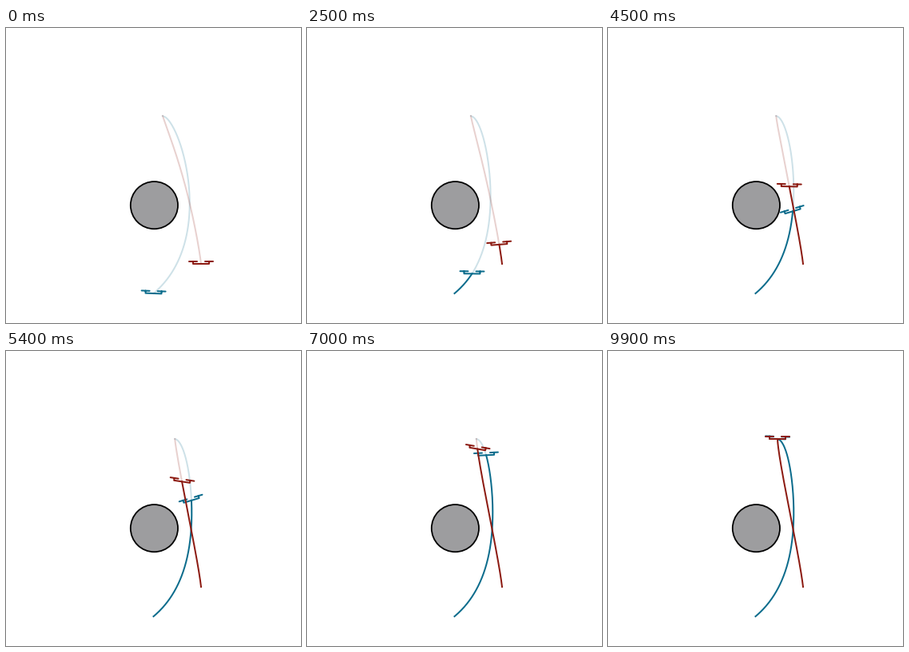
Recreate the animation shown at these times as a matplotlib script. Size 369x369 px, loop 10 s.

```python
import numpy as np
import matplotlib.pyplot as plt
from matplotlib.animation import FuncAnimation
from matplotlib.patches import Circle

SIZE = 369
FRAMES, STEP = 100, 100
LOOP = FRAMES * STEP / 1000
BLUE, RED = "#0b6c8c", "#8c1a11"
GRAVITY = 26  # pixels per second squared


def bezier(p0, p1, p2, p3):
    t = np.linspace(0, 1, 500)[:, None]
    p0, p1, p2, p3 = map(np.array, (p0, p1, p2, p3))
    return ((1 - t) ** 3 * p0 + 3 * t * (1 - t) ** 2 * p1
            + 3 * t * t * (1 - t) * p2 + t ** 3 * p3)


def min_jerk(u):
    return u ** 3 * (10 - 15 * u + 6 * u * u)


class Drone:
    """Climbs its path and tilts with its own acceleration."""

    def __init__(self, ax, color, path, lead, power, slack, z):
        # Sorted by rising y, so the goal comes first.
        self.xs, self.ys = path[::-1].T
        self.lead, self.power, self.slack = lead, power, slack
        style = dict(color=color, lw=2, solid_joinstyle="round")
        self.plan, = ax.plot([], [], alpha=0.2, zorder=z, **style)
        self.trail, = ax.plot([], [], zorder=z + 2, **style)
        self.body, = ax.plot([], [], zorder=z + 3,
                             solid_capstyle="round", **style)

    def x_at(self, y):
        return np.interp(y, self.ys, self.xs)

    def position(self, t):
        t = np.clip(t / LOOP, 0, 1)
        u = t + self.lead * t ** self.power * (1 - t)
        y = self.ys[-1] + (self.ys[0] - self.ys[-1]) * min_jerk(u)
        return np.array([self.x_at(y), y])

    def tilt(self, t, h=0.4):
        ax, ay = (self.position(t - h) - 2 * self.position(t)
                  + self.position(t + h)) / h ** 2
        return np.arctan2(ax, GRAVITY - ay)

    def update(self, t):
        x, y = self.position(t)
        past = np.linspace(self.ys[-1], y, 150)
        self.trail.set_data(self.x_at(past), past)
        self.draw_plan(y, t / LOOP)
        self.draw_body(x, y, self.tilt(t))

    def draw_plan(self, y, t):
        # The planned goal drifts right until it settles on the final one.
        v = np.linspace(0, 1, 150)
        ahead = y + (self.ys[0] - y) * v
        drift = 16 * np.exp(-(t / 0.28) ** 1.7) * v ** 3
        slack = self.slack * np.sin(np.pi * min(t / 0.45, 1)) * 4 * v * (1 - v)
        self.plan.set_data(self.x_at(ahead) - drift - slack, ahead)

    def draw_body(self, x, y, a):
        gap = (np.nan, np.nan)
        px, py = np.array([(-10, -3), (-10, 0), (10, 0), (10, -3), gap,
                           (-15, -3), (-5, -3), gap, (5, -3), (15, -3)]).T
        self.body.set_data(x + px * np.cos(a) - py * np.sin(a),
                           y + px * np.sin(a) + py * np.cos(a))


fig = plt.figure(figsize=(SIZE / 72, SIZE / 72), dpi=72, facecolor="white")
ax = fig.add_axes([0, 0, 1, 1])
ax.set_xlim(0, SIZE)
ax.set_ylim(SIZE, 0)
ax.axis("off")
ax.add_patch(Circle((185.4, 221.7), 29.6, fc="#9d9d9f", ec="black", lw=1.8))

around = np.vstack([
    bezier((184.5, 332), (216.4, 305.3), (232.3, 262), (232.3, 202)),
    bezier((232.3, 202), (232.3, 160), (224, 112), (212, 110)),
])
direct = bezier((244, 295), (239, 252), (213.3, 140), (212, 110))

drones = [
    Drone(ax, BLUE, around, lead=0.6, power=3, slack=1.8, z=2),
    Drone(ax, RED, direct, lead=0.63, power=2.15, slack=0, z=6),
]


def draw(i):
    for d in drones:
        d.update(i * STEP / 1000)
    return [line for d in drones for line in (d.plan, d.trail, d.body)]


anim = FuncAnimation(fig, draw, frames=FRAMES, interval=STEP, repeat=True,
                     repeat_delay=0)
plt.show()
```
